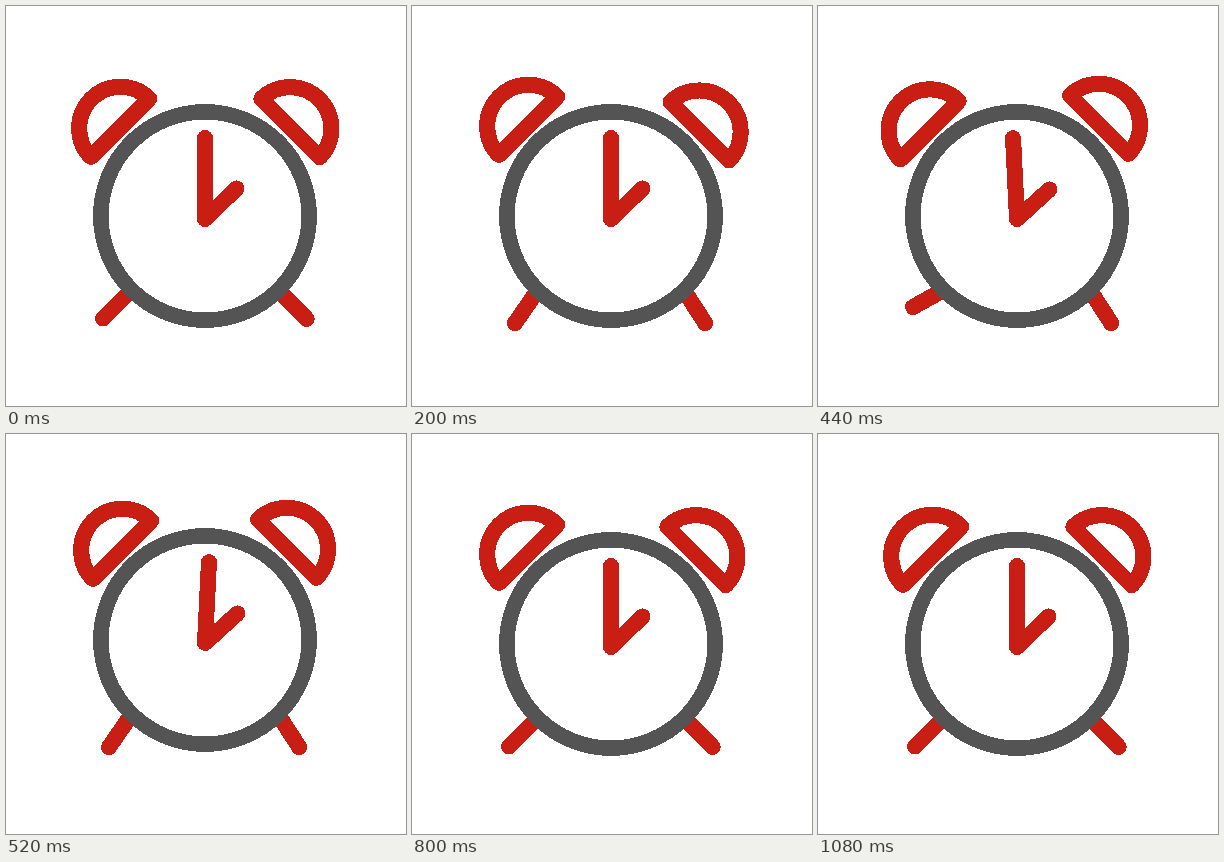
Animation, 400 px wide and 400 px high, one loop 4.16 s. Source, as an HTML page without scripts:

```html
<!DOCTYPE html>
<html lang="en">
<head>
<meta charset="utf-8">
<title>Ringing alarm clock</title>
<style>
  html, body { margin: 0; width: 100%; height: 100%; overflow: hidden; background: #fff; }
  svg { display: block; width: 100%; height: 100%; shape-rendering: crispEdges; }
  .red { fill: none; stroke: #c81e14; stroke-width: 16; stroke-linecap: round; stroke-linejoin: round; }
  .rim { fill: #fff; stroke: #545454; stroke-width: 15.5; }
</style>
</head>
<body>
<svg viewBox="0 0 400 400">
  <!-- Master cycle: each part shakes at its own rate for 1.08 s, then rests. -->
  <animate id="cycle" attributeName="opacity" values="1;1" dur="4.16s" begin="0s;cycle.end"/>

  <g>
    <animateTransform attributeName="transform" type="translate" calcMode="discrete"
      values="0 0;0 -4" keyTimes="0;.59" dur=".2s" repeatDur="1.08s" begin="cycle.begin"/>

    <path class="red" d="M126.7 282.8 97 312.5">
      <animate attributeName="d" calcMode="discrete" dur=".16s" repeatDur="1.08s" begin="cycle.begin"
        values="M126.7 282.8 97 312.5;M126.7 282.8 103 317.2;M126.7 282.8 97 312.5;M131 281 95 301"/>
    </path>
    <path class="red" d="M271 283.3 300.7 313">
      <animate attributeName="d" calcMode="discrete" dur=".08s" repeatDur="1.08s" begin="cycle.begin"
        values="M271 283.3 300.7 313;M271 282.8 293.2 317.2"/>
    </path>

    <path class="red" d="M84.8 150.9A41.3 41.3 0 0 1 143.2 92.5Z">
      <animateTransform attributeName="transform" type="translate" calcMode="discrete"
        values="0 0;-2.5 2.5;2 -2;0 0" dur=".32s" repeatDur="1.08s" begin="cycle.begin"/>
    </path>
    <path class="red" d="M313.7 151.2A41.3 41.3 0 0 0 255.3 92.8Z">
      <animateTransform attributeName="transform" type="translate" calcMode="discrete"
        values="0 0;-3.3 -3.3;3.3 3.3" keyTimes="0;.09;.49" dur=".4s" repeatDur="1.08s" begin="cycle.begin"/>
    </path>

    <circle class="rim" cx="199" cy="210" r="104.2"/>

    <path class="red" d="M199 213 230.5 182.5">
      <animateTransform attributeName="transform" type="rotate" calcMode="discrete"
        values="0 199 213;0 199 213;1.7 199 213;0 199 213;0 199 213"
        dur="1s" repeatDur="1.08s" begin="cycle.begin"/>
    </path>
    <path class="red" d="M199 213V132">
      <animateTransform attributeName="transform" type="rotate" calcMode="discrete"
        values="0 199 213;-2.8 199 213;-1.3 199 213;2.8 199 213;1.4 199 213"
        dur=".2s" repeatDur="1.08s" begin="cycle.begin"/>
    </path>
  </g>
</svg>
</body>
</html>
```
